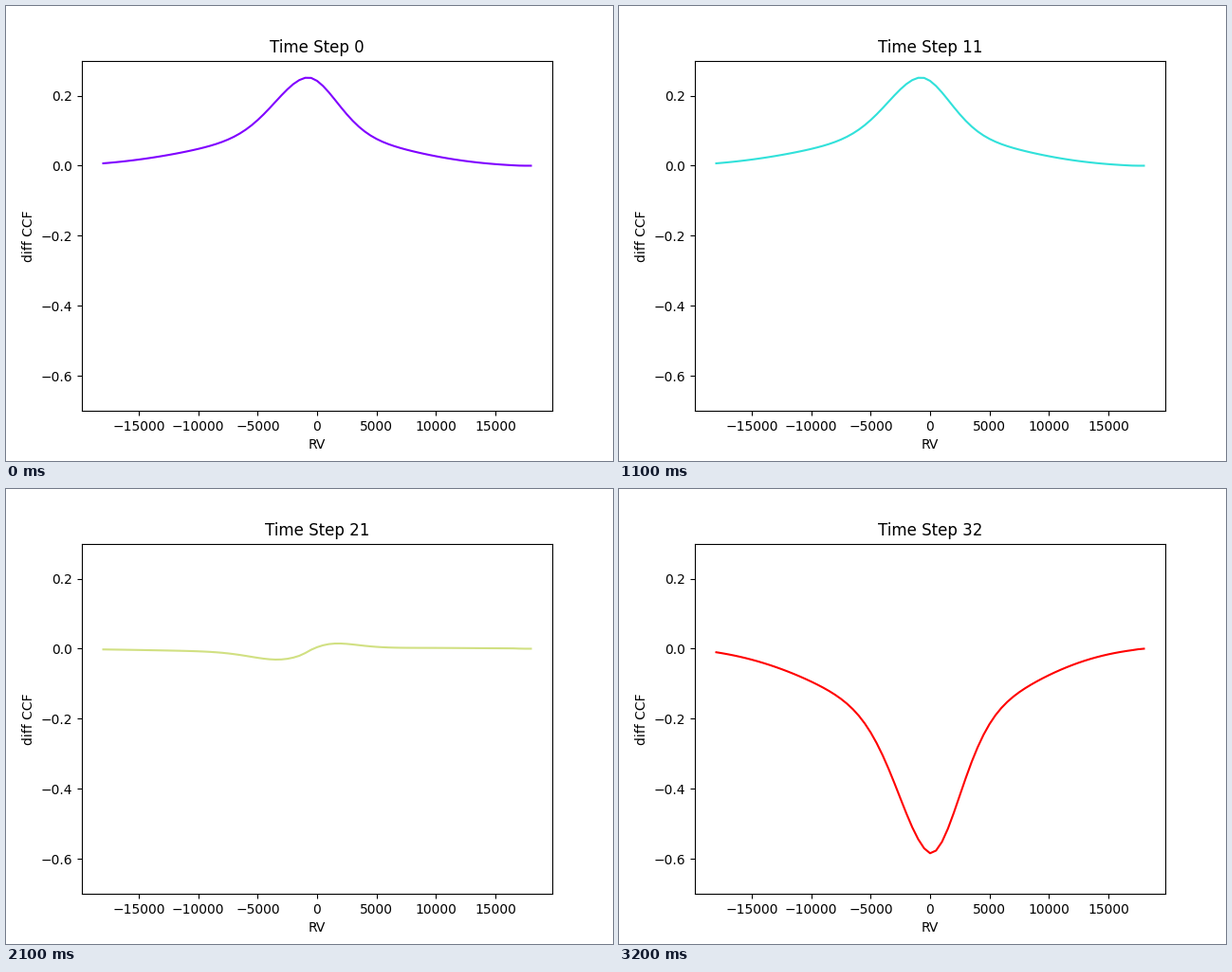
A matplotlib script for the animation above (3.3 s loop, 640 by 480 pixels).

```python
import numpy as np
import matplotlib.pyplot as plt
from matplotlib.animation import FuncAnimation

STEPS = 33
RV = np.arange(-18000, 18001, 500)
CENTRE, EDGE = -750, 17200
MID_TRANSIT, HALF_TRANSIT = 30, 15.1


def profile(rv):
    """Line profile: a narrow core on broad wings, steeper on the right."""
    r = (np.minimum(rv, EDGE) - CENTRE) / 1000
    r = np.abs(np.where(r > 0, r / 0.868, r))
    return 0.642 * np.exp(-(r / 3.96) ** 1.86) + 0.375 * np.exp(-(r / 11.8) ** 2)


def depth(step):
    """Strength of the hidden part of the line."""
    u = (step - MID_TRANSIT) / HALF_TRANSIT
    return 0.868 * max(0.0, 1 - u * u) ** 2.7


def shift(step):
    """Velocity offset of the hidden part."""
    s = step - 28
    return 127.5 * s + 6.9 * s * s


def diff_ccf(step):
    y = 0.252 * profile(RV) - depth(step) * profile(RV - shift(step))
    return y - y[-1]


fig, ax = plt.subplots(figsize=(6.4, 4.8), dpi=100)
colors = plt.cm.rainbow(np.linspace(0, 1, STEPS))
line, = ax.plot(RV, diff_ccf(0), color=colors[0])
title = ax.set_title("Time Step 0")
ax.set_xlim(-19800, 19800)
ax.set_ylim(-0.7, 0.3)
ax.set_xlabel("RV")
ax.set_ylabel("diff CCF")


def update(step):
    line.set_ydata(diff_ccf(step))
    line.set_color(colors[step])
    title.set_text(f"Time Step {step}")
    return line, title


anim = FuncAnimation(fig, update, frames=STEPS, interval=100, repeat=True,
                     repeat_delay=0, blit=False)
plt.show()
```
